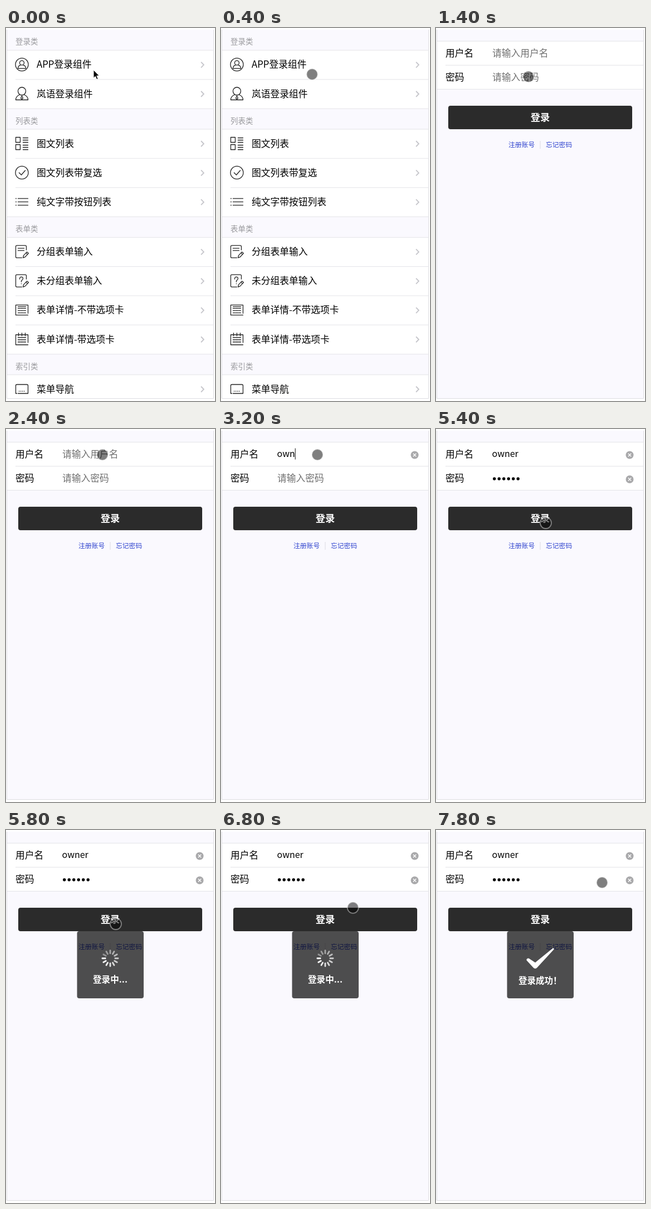
An HTML page that plays this animation: 375x667 px, repeating every 8000 ms.

```html
<!DOCTYPE html>
<html lang="zh-CN">
<head>
<meta charset="utf-8">
<title>登录组件</title>
<style>
  html, body { margin: 0; width: 100%; height: 100%; overflow: hidden; background: #fff; }
  svg { display: block; width: 100%; height: 100%; }
  text { font-family: "Noto Sans CJK SC", "Noto Sans CJK", "Noto Sans", sans-serif; white-space: pre; }
  .icon { fill: none; stroke: #222; stroke-width: 1.3; stroke-linejoin: round; stroke-linecap: round; }
</style>
</head>
<body>
<svg id="stage" viewBox="0 0 375 667">
  <defs>
    <clipPath id="screen"><rect x="2" y="3" width="370" height="659"/></clipPath>
    <g id="clear">
      <circle r="7" fill="#a9a9ab"/>
      <path d="M-2.7-2.7L2.7 2.7M2.7-2.7L-2.7 2.7" stroke="#fff" stroke-width="1.3"/>
    </g>
  </defs>
  <rect x="1.5" y="3" width="371" height="659.5" fill="#faf9fe"/>
  <g id="list" clip-path="url(#screen)"></g>
  <g id="login"></g>
  <path d="M1.5 3V662.5H372.5V3" fill="none" stroke="#dedee2"/>
  <path id="arrow" d="M157 75V89.5L160.3 86.5L162.8 92L165.2 91L162.8 85.6H167.3Z" fill="#000" stroke="#fff" stroke-width="1"/>
  <circle id="dot" r="10" fill="#000" fill-opacity=".5" stroke="#fff" stroke-opacity=".42" stroke-width="1.8"/>
</svg>
<script>
const LOOP = 8000, STEP = 200, FONT = 16.75;
const USER = 'owner';
const $ = id => document.getElementById(id);

function add(parent, tag, attrs = {}, content) {
  const node = document.createElementNS('http://www.w3.org/2000/svg', tag);
  for (const key in attrs) node.setAttribute(key, attrs[key]);
  if (content) node.textContent = content;
  return parent.appendChild(node);
}

// Places text by its vertical centre.
const label = (parent, x, cy, content, size = FONT, attrs = {}) =>
  add(parent, 'text', { x, y: cy + size * .37, 'font-size': size, ...attrs }, content);
const box = (parent, x, y, width, height, fill, rx = 0) =>
  add(parent, 'rect', { x, y, width, height, fill, rx });
const rule = (parent, x, y) => box(parent, x, y - .5, 372 - x, 1, '#e4e4e8');
const show = (node, on) => node.setAttribute('visibility', on ? 'visible' : 'hidden');

const ring = r => `M${-r} 0a${r} ${r} 0 1 1 ${2 * r} 0a${r} ${r} 0 1 1 ${-2 * r} 0`;
const pen = 'M2 11L3 7L9 .5L12 3L5.5 9.8ZM7.5 2.5L10 5';
const page = 'M8-3V-9Q8-11 6-11H-9Q-11-11-11-9V9Q-11 11-9 11H0';
const cells = 'M-7-3h4M-2-3h4M3-3h4M-7 1h4M-2 1h4M3 1h4M-7 5h4M-2 5h4M3 5h4';

const groups = [
  ['登录类', [
    ['APP登录组件', ring(11.5) + 'M-4-3a4 4 0 1 1 8 0a4 4 0 1 1-8 0M-2.5 1Q-7 2-7 7H7Q7 2 2.5 1'],
    ['岚语登录组件', 'M-7-4.5a7 7 0 1 1 14 0a7 7 0 1 1-14 0M-4.5 2Q-11 5-11 11H11Q11 5 4.5 2M0 4L2 8L0 10L-2 8Z']]],
  ['列表类', [
    ['图文列表', 'M-11-11h8v9h-8ZM-11 2h8v9h-8ZM2-10h9M2-6h9M2-2h9M2 3h9M2 7h9M2 11h9'],
    ['图文列表带复选', ring(11.5) + 'M-5 0L-1 4L6-4'],
    ['纯文字带按钮列表', 'M-11-6h1M-7-6H11M-11 0h1M-7 0H11M-11 6h1M-7 6H11']]],
  ['表单类', [
    ['分组表单输入', page + 'M-7-6H4M-7-2H4' + pen],
    ['未分组表单输入', page + 'M-4-3Q-4-7-1-7Q2-7 2-4Q2-2-1 0V2M-1 5v.3' + pen],
    ['表单详情-不带选项卡', 'M-11-9H11V6M11 9H-11V-9M-7-6H7' + cells],
    ['表单详情-带选项卡', 'M-11-8H11V6M11 10H-11V-8M-6-11v5M0-11v5M6-11v5' + cells]]],
  ['索引类', [
    ['菜单导航', 'M-9 8H-11V-6Q-11-8-9-8H9Q11-8 11-6V8H-7M-5 4h.4M-2 4h.4M1 4h.4M4 4h.4']]]
];

function buildList(root) {
  let y = 3;
  for (const [title, rows] of groups) {
    label(root, 17, y + 21.5, title, 13.5, { fill: '#99999d', 'font-weight': 500 });
    y += 36.8;
    box(root, 2, y, 370, rows.length * 52.2, '#fff');
    rule(root, 2, y);
    rows.forEach(([name, icon], i) => {
      const cy = y + 25.5;
      if (i) rule(root, 17, y);
      add(root, 'path', { class: 'icon', d: icon, transform: `translate(28.5 ${cy})` });
      label(root, 55, cy, name);
      add(root, 'path', { d: `M350 ${cy - 4.5}l4.8 5l-4.8 5`, fill: 'none', stroke: '#c7c7cc', 'stroke-width': 1.9 });
      y += 52.2;
    });
    rule(root, 2, y);
  }
}

function buildLogin(root) {
  const bold = { 'font-weight': 700, fill: '#fff', 'text-anchor': 'middle' };
  const ui = {};
  box(root, 2, 23, 370, 86.5, '#fff');
  [[2, 23.5], [17, 66.5], [2, 109.5]].forEach(([x, y]) => rule(root, x, y));
  label(root, 17, 44.5, '用户名');
  label(root, 17, 88, '密码');
  ui.userHint = label(root, 101, 44.5, '请输入用户名', FONT, { fill: '#707070' });
  ui.passHint = label(root, 101, 88, '请输入密码', FONT, { fill: '#707070' });
  ui.user = label(root, 100.5, 44.5, '', 16);
  ui.bullets = Array.from({ length: 6 }, (_, i) => add(root, 'circle', { cx: 104.7 + i * 8.5, cy: 89, r: 2.7 }));
  ui.clears = [46.5, 90].map(y => add(root, 'use', { href: '#clear', x: 347.5, y }));
  ui.caret = box(root, 0, 0, 1, 20, '#111');

  box(root, 22, 139, 330, 42, '#2b2b2b', 4);
  label(root, 187, 160, '登录', 17.3, bold);
  label(root, 130, 209, '注册账号', 11.8, { fill: '#3145cf' });
  label(root, 197, 209, '忘记密码', 11.8, { fill: '#3145cf' });
  box(root, 186.5, 202, 1, 14, '#dcdce2');

  ui.toast = add(root, 'g');
  box(ui.toast, 127.5, 181, 119.5, 120, 'rgba(0,0,0,.69)', 4);
  ui.busy = add(ui.toast, 'g');
  ui.spokes = Array.from({ length: 12 }, (_, i) => add(ui.busy, 'rect', {
    x: -1.4, y: -15.5, width: 2.8, height: 8, rx: 1.4, fill: '#fff',
    transform: `translate(187 229.5) rotate(${i * 30})`
  }));
  label(ui.busy, 187, 267, '登录中...', 15.6, bold);
  ui.done = add(ui.toast, 'g');
  add(ui.done, 'path', {
    d: 'M162.5 233Q162 229 166.5 229.5L178 237L209.5 211.5Q212.5 210.5 211.5 213.5L181 246.5Q178 249 175 246.5Z', fill: '#fff'
  });
  label(ui.done, 148, 269, '登录成功！', 15.5, { fill: '#fff', 'font-weight': 700 });
  return ui;
}

// [time, x, y]
const path = [
  [200, 163, 82], [1000, 166, 87], [1600, 166, 87], [2400, 173, 46], [3600, 173, 46],
  [4200, 151, 80], [4800, 151, 80], [5400, 197, 168], [6200, 197, 168], [7600, 298, 94]
];

function pointAt(t) {
  const next = path.findIndex(p => p[0] > t);
  if (next < 0) return path[path.length - 1].slice(1);
  if (next === 0) return path[0].slice(1);
  const [t0, x0, y0] = path[next - 1], [t1, x1, y1] = path[next];
  const u = (t - t0) / (t1 - t0), e = u * u * (3 - 2 * u);
  return [x0 + (x1 - x0) * e, y0 + (y1 - y0) * e];
}

const typed = (t, start, gap, max) => t < start ? 0 : Math.min(max, 1 + Math.floor((t - start) / gap));

buildList($('list'));
const ui = buildLogin($('login'));

function render(t) {
  const onLogin = t >= 1000;
  $('list').style.display = onLogin ? 'none' : '';
  $('login').style.display = onLogin ? '' : 'none';

  const letters = typed(t, 2800, 200, USER.length);
  const bullets = typed(t, 4400, 130, 6);
  ui.user.textContent = USER.slice(0, letters);
  show(ui.userHint, !letters);
  show(ui.passHint, !bullets);
  show(ui.clears[0], letters);
  show(ui.clears[1], bullets);
  ui.bullets.forEach((b, i) => show(b, i < bullets));

  const inPassword = t >= 4200;
  const offset = inPassword ? bullets * 8.5 : letters && ui.user.getComputedTextLength();
  ui.caret.setAttribute('x', 100.5 + offset);
  ui.caret.setAttribute('y', inPassword ? 78 : 34.5);
  show(ui.caret, t >= 2600 && t < 5400);

  const done = t >= 7200;
  ui.toast.style.display = t >= 5600 ? '' : 'none';
  ui.busy.style.display = done ? 'none' : '';
  ui.done.style.display = done ? '' : 'none';
  const lead = Math.floor(t * 12 / 1000);
  ui.spokes.forEach((s, i) => s.setAttribute('opacity', 1 - ((lead - i) % 12) * .055));

  const [x, y] = pointAt(t);
  $('dot').setAttribute('transform', `translate(${x} ${y})`);
  show($('dot'), t >= 200);
  show($('arrow'), t < 200);
}

let origin;
function tick(now) {
  origin ??= now;
  render(Math.floor(((now - origin) % LOOP) / STEP) * STEP);
  requestAnimationFrame(tick);
}
render(0);
requestAnimationFrame(tick);
</script>
</body>
</html>
```
